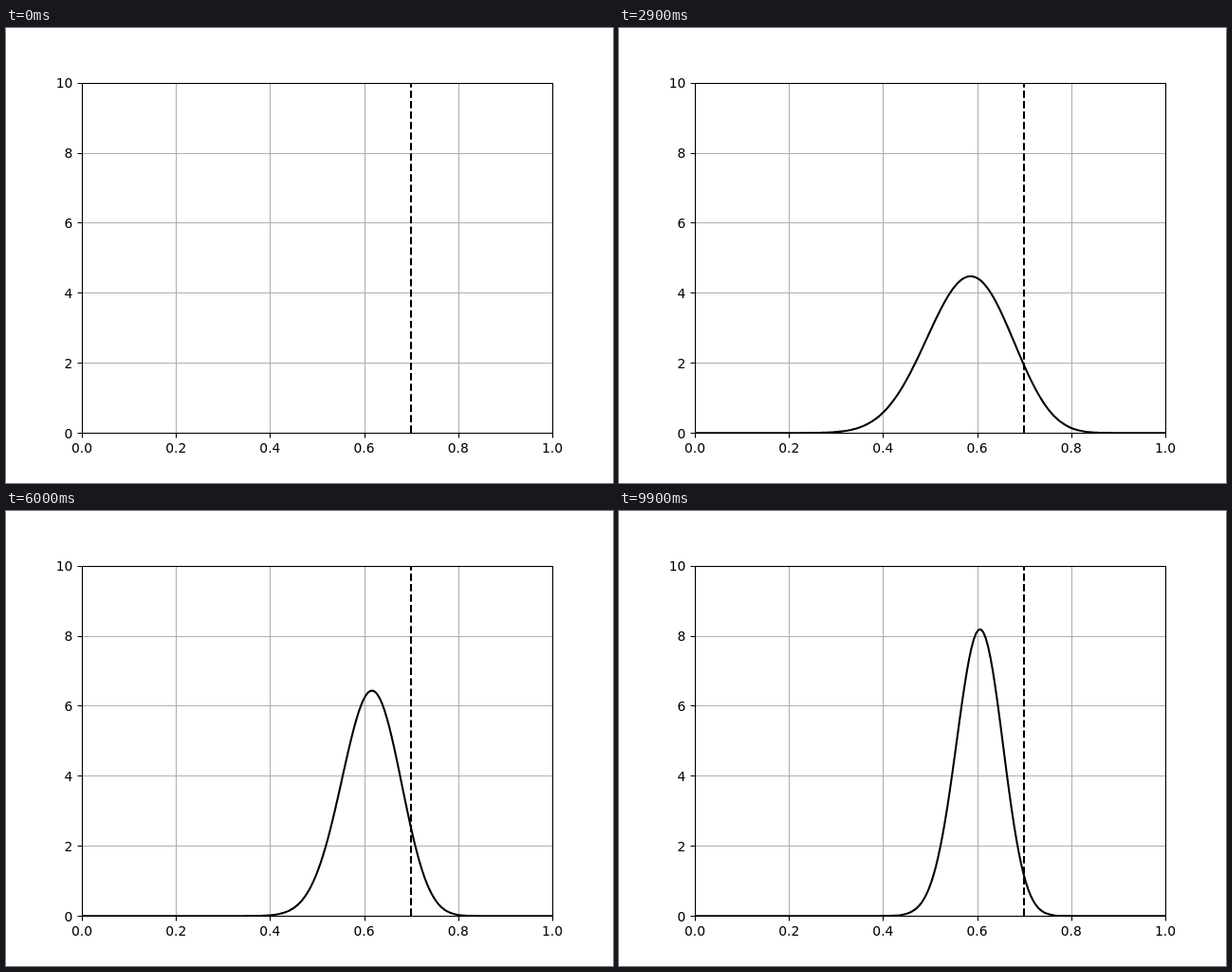
These frames come from a looping animation (640x480 px, 10000 ms). An HTML page:

```html
<!DOCTYPE html>
<html lang="en">
<head>
<meta charset="utf-8">
<title>Bayesian update</title>
<style>
  html, body { margin: 0; width: 100%; height: 100%; overflow: hidden; background: #fff; }
  svg { display: block; }
  text { font: 13.889px "DejaVu Sans", sans-serif; }
</style>
</head>
<body>
<svg id="chart" width="640" height="480" viewBox="0 0 640 480" fill="none" stroke-width="1.111">
  <clipPath id="area"><rect x="80" y="58" width="497" height="370"/></clipPath>
  <g id="grid" stroke="#b0b0b0"></g>
  <g id="ticks" stroke="#000"></g>
  <g clip-path="url(#area)" stroke="#000" stroke-width="2.083">
    <path id="curve" stroke-linejoin="round" stroke-linecap="square"/>
    <path d="M427 427V58" stroke-dasharray="7.708 3.333"/>
  </g>
  <rect x="80.5" y="58.5" width="496" height="369" stroke="#000"/>
  <g id="labels" fill="#000"></g>
</svg>
<script>
const STEP = 100, TRIALS = 100, PROB = 0.7, POINTS = 200;
const px = x => 80 + 496 * x;
const py = y => 427.2 - 36.96 * y;
const snap = v => Math.floor(v + 0.5) + 0.5;
const byId = id => document.getElementById(id);

function add(parent, tag, attrs, text = "") {
  const el = document.createElementNS("http://www.w3.org/2000/svg", tag);
  for (const key in attrs) el.setAttribute(key, attrs[key]);
  el.textContent = text;
  byId(parent).append(el);
}

function drawAxes() {
  for (let k = 0; k <= 5; k++) {
    const x = px(k / 5), y = py(2 * k), sx = snap(x), sy = snap(y);
    add("grid", "path", { d: `M${sx} 58V427.5M80.5 ${sy}H576` });
    add("ticks", "path", { d: `M${sx} 427.5V432.5M80.5 ${sy}H75.5` });
    add("labels", "text", { x, y: 448, "text-anchor": "middle" }, (k / 5).toFixed(1));
    add("labels", "text", { x: 70.3, y: Math.round(y + 5.4), "text-anchor": "end" }, 2 * k);
  }
}

// MT19937 generator giving 53-bit floats in [0, 1)
function twister(seed) {
  const N = 624, mt = new Uint32Array(N);
  let pos = N;
  mt[0] = seed;
  for (let i = 1; i < N; i++) {
    mt[i] = Math.imul(1812433253, mt[i - 1] ^ (mt[i - 1] >>> 30)) + i;
  }
  function refill() {
    for (let i = 0; i < N; i++) {
      const y = (mt[i] & 0x80000000) | (mt[(i + 1) % N] & 0x7fffffff);
      mt[i] = mt[(i + 397) % N] ^ (y >>> 1) ^ (y & 1 ? 0x9908b0df : 0);
    }
    pos = 0;
  }
  function next() {
    if (pos === N) refill();
    let y = mt[pos++];
    y ^= y >>> 11;
    y ^= (y << 7) & 0x9d2c5680;
    y ^= (y << 15) & 0xefc60000;
    y ^= y >>> 18;
    return y >>> 0;
  }
  return () => {
    const a = next() >>> 5, b = next() >>> 6;
    return (a * 67108864 + b) / 9007199254740992;
  };
}

// Running number of successes after each trial
const random = twister(19680801);
const wins = [0];
for (let i = 1; i < TRIALS; i++) wins.push(wins[i - 1] + (random() < PROB ? 1 : 0));

// Beta(s + 1, n - s + 1) density
function posterior(n) {
  if (n === 0) return "";
  const s = wins[n];
  let scale = n + 1;
  for (let k = 1; k <= s; k++) scale *= (n - s + k) / k;
  let d = "";
  for (let k = 0; k < POINTS; k++) {
    const x = k / (POINTS - 1);
    const y = scale * x ** s * (1 - x) ** (n - s);
    d += `${k ? "L" : "M"}${px(x).toFixed(3)} ${py(y).toFixed(3)}`;
  }
  return d;
}

let shown = -1;
function render() {
  const n = Math.floor(performance.now() / STEP) % TRIALS;
  if (n !== shown) {
    shown = n;
    byId("curve").setAttribute("d", posterior(n));
  }
  requestAnimationFrame(render);
}

drawAxes();
render();
</script>
</body>
</html>
```
